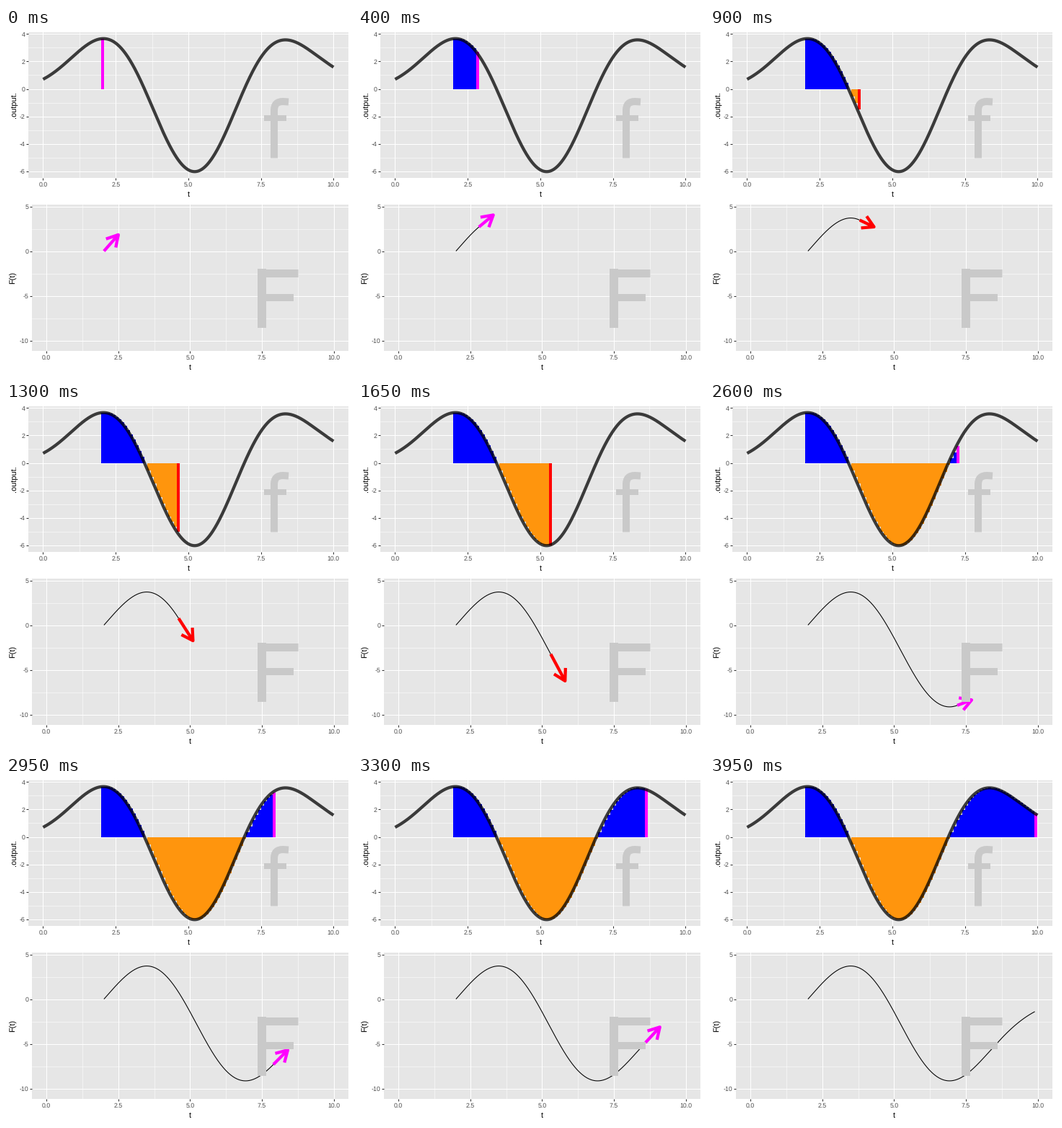
Recreate the animation shown at these times as a matplotlib script. Size 480 by 480 pixels, loop 4 s.

```python
import numpy as np
import matplotlib.pyplot as plt
from matplotlib.animation import FuncAnimation
from matplotlib.patches import PathPatch
from matplotlib.path import Path
from matplotlib.transforms import Affine2D

SIZE, RIGHT = 480, 474.5
STEPS, START, DT = 80, 2.0, 0.1
UNIT_X, UNIT_Y = 39.84, 12.4
plt.rcParams.update({"font.family": "Liberation Sans", "text.hinting": "none"})


def f(t):
    """Wave with two zeros under a slightly skewed bell."""
    s = t - 5.2
    decay = 0.1195 + 0.0055 * np.hypot(1, s) + 0.0025 * s - 0.00014 * s**3
    return (s + 1.71) * (s - 1.73) * np.exp(0.711 + 0.01 * s - decay * s**2)


# Antiderivative on a fine grid, zero at START
grid = np.linspace(START, 10, 1601)
mid = f((grid[1:] + grid[:-1]) / 2)
area = np.append(0, np.cumsum(mid * np.diff(grid)))

# dpi 72 makes one point one pixel
fig = plt.figure(figsize=(SIZE / 72, SIZE / 72), dpi=72, facecolor="white")
px = Affine2D().scale(1 / SIZE, -1 / SIZE).translate(0, 1) + fig.transFigure


def title(x, y, text, rotation=0):
    fig.text(x, y, text, transform=px, size=11, ha="center", va="baseline",
             rotation=rotation, rotation_mode="anchor")


def panel(left, top, bottom, zero, unit, yticks, ylabel):
    """Grey plot panel; zero is the pixel row of y = 0, unit the pixels per 1."""
    ax = fig.add_axes([left / SIZE, 1 - bottom / SIZE,
                       (RIGHT - left) / SIZE, (bottom - top) / SIZE],
                      facecolor="#e6e6e6")
    ax.spines[:].set_visible(False)
    ax.set_axisbelow(True)
    xticks = np.linspace(0, 10, 5)
    ax.set_xticks(xticks, [f"{v:.1f}" for v in xticks])
    ax.set_yticks(yticks, [str(v) for v in yticks])
    ax.set_xticks(xticks[:-1] + 1.25, minor=True)
    ax.set_yticks(np.array(yticks[:-1]) + yticks.step / 2, minor=True)
    ax.tick_params(which="major", length=2.75, width=1.07, pad=2.2,
                   color="#333333", labelcolor="#4d4d4d", labelsize=8.8)
    ax.tick_params(which="minor", length=0)
    ax.grid(which="major", color="white", lw=1.07)
    ax.grid(which="minor", color="white", lw=0.53)
    ax.set_xlim(-0.5, 10.5)
    ax.set_ylim((zero - bottom) / unit, (zero - top) / unit)
    ax.set_autoscale_on(False)
    title((left + RIGHT) / 2, bottom + 25.2, "t")
    title(13.3, (top + bottom) / 2, ylabel, 90)
    return ax


def stroke(width, *points, codes=None):
    fig.add_artist(PathPatch(Path(points, codes), transform=px, fill=False,
                             edgecolor="#c9c9c9", lw=width, capstyle="butt",
                             zorder=3))


upper = panel(31.3, 5.5, 208.3, 84.5, 19.05, range(-6, 5, 2), ".output.")
lower = panel(36.3, 245.5, 448.3, 309.5, UNIT_Y, range(-10, 6, 5), "F(t)")

# Large letter f: stem with hook, crossbar
stroke(10, (372, 180.5), (372, 114), (372, 102), (384, 102), (392, 102.5),
       codes=[Path.MOVETO, Path.LINETO, Path.CURVE3, Path.CURVE3, Path.LINETO])
stroke(8, (358, 125), (388.5, 125))
# Large letter F
stroke(12, (355, 416), (355, 334))
stroke(11, (349, 339.5), (405, 339.5))
stroke(10, (349, 374), (399, 374))

# Moving parts
times = START + DT * np.arange(STEPS)
heights = f(times)
bars = upper.bar(times, heights, width=DT, align="edge", lw=0,
                 antialiased=False, zorder=2)
ts = np.linspace(0, 10, 501)
upper.plot(ts, f(ts), color="black", alpha=0.75, lw=4.27,
           solid_capstyle="butt", solid_joinstyle="round", zorder=3)
trace, = lower.plot([], [], color="black", lw=1.07,
                    solid_capstyle="butt", zorder=2)
arrow, = lower.plot([], [], lw=4.27, solid_capstyle="butt",
                    solid_joinstyle="round", zorder=3)


def arrow_points(t, y, slope, reach=0.5, head=18):
    """Tangent arrow with an open head, 30 degrees to each side."""
    tip = np.array([t + reach, y + reach * slope])
    back = np.arctan2(-slope * UNIT_Y, -UNIT_X)
    wings = [tip + head * np.array([np.cos(back + a) / UNIT_X,
                                    np.sin(back + a) / UNIT_Y])
             for a in (-np.pi / 6, np.pi / 6)]
    return np.array([(t, y), tip, (np.nan, np.nan), wings[0], tip, wings[1]])


def update(k):
    t, slope = times[k], heights[k]
    for i, bar in enumerate(bars):
        bar.set_visible(i <= k)
        bar.set_facecolor("#0000ff" if heights[i] > 0 else "#ff950d")
    now = "#ff00ff" if slope > 0 else "#ff0000"
    bars[k].set_facecolor(now)

    done = grid <= t + 1e-9
    trace.set_data(grid[done], area[done])
    arrow.set_data(*arrow_points(t, area[done][-1], slope).T)
    arrow.set_color(now)
    arrow.set_visible(t + 0.5 < 10 + 1e-9)
    return [*bars, trace, arrow]


anim = FuncAnimation(fig, update, frames=STEPS, interval=50,
                     repeat=True, repeat_delay=0)
plt.show()
```
